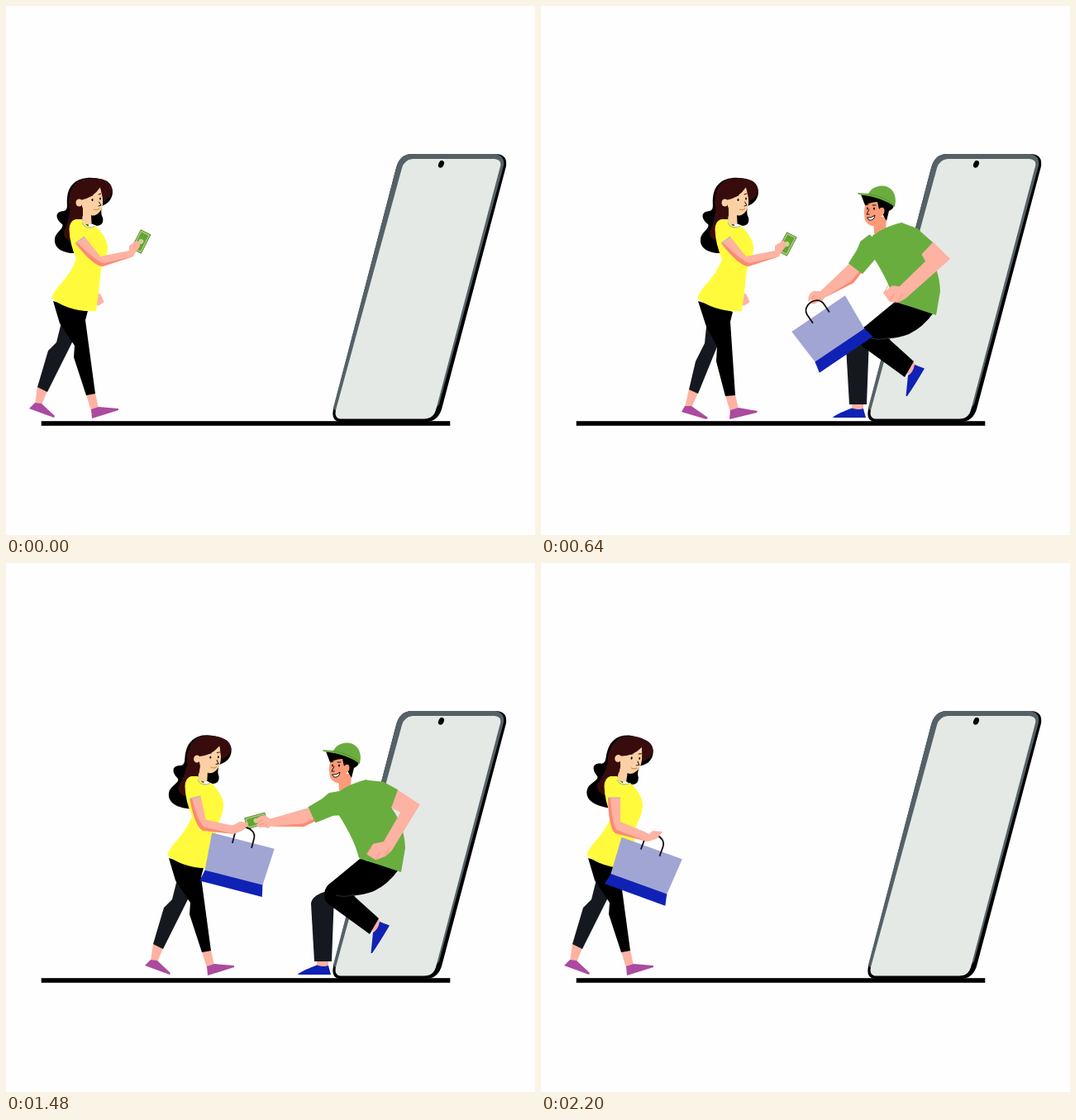
Write an HTML page that moves like this. It is 640 by 640 pixels and loops after 2440 ms.

```html
<!DOCTYPE html>
<html lang="en">
<head>
<meta charset="utf-8">
<title>Delivery from the phone</title>
<style>
html, body { margin: 0; width: 100%; height: 100%; overflow: hidden; background: #fefefe; }
svg { display: block; width: 100vw; height: 100vh; }
.skin { fill: #fdb2a2; }
.shade { fill: #fb8b72; }
.face { fill: #fcd0a4; }
.tan { fill: #fb9b78; }
.green { fill: #6aad3f; }
.navy { fill: #15191f; }
.blue { fill: #0f22b5; }
.purple { fill: #ab4a9f; }
.yellow { fill: #fffb3c; }
.brown { fill: #380c0d; }
.line { fill: none; stroke: #111; stroke-width: 1; stroke-linecap: round; }
.handle { fill: none; stroke: #111; stroke-width: 1.8; }
.crease { fill: none; stroke: #fb8b72; stroke-width: .8; }
.hem { fill: none; stroke: #b9bdb5; stroke-width: 1.3; }
</style>
</head>
<body>
<svg viewBox="0 0 640 640">
  <defs>
    <clipPath id="door"><path d="M0,0H590L412.5,640H0Z"/></clipPath>
    <g id="bag">
      <path fill="#a1a5d4" d="M266,321H344L341,368H269Z"/>
      <path class="blue" d="M269,367H341L344,381H266Z"/>
      <path class="handle" d="M293,327V315C293,301 317,301 317,315V327"/>
    </g>
    <g id="cash">
      <rect x="-12.6" y="-6.6" width="25.2" height="13.2" fill="#a9cc78" stroke="#4f7a2a" stroke-width=".8"/>
      <rect x="-10.6" y="-4.7" width="21.2" height="9.4" fill="#63a532"/>
      <circle r="3" fill="#c9d596"/>
    </g>
  </defs>

  <g id="phone">
    <path d="M490,179H592Q607,179 605,194L527,488Q522,503 508,503H404Q393,502 396,488L472,196Q476,180 490,179Z"/>
    <path fill="#566167" d="M490,179H593Q604,182 602,193L524,482L518,489H398L396,486L472,196Q476,180 490,179Z"/>
    <path fill="#e4e9e5" d="M492,185H591Q600,186 598,194L520,489Q517,499.5 506,499.5H404Q397,498 399,489L479,196Q482,186 492,185Z"/>
    <ellipse cx="526.5" cy="191.3" rx="3.2" ry="4.6" transform="rotate(25 526.5 191.3)"/>
  </g>
  <rect x="42.700" y="502.200" width="494.600" height="5.600"/>

  <g clip-path="url(#door)">
    <g id="man">
      <path class="skin" d="M376,480H390V489H376Z"/>
      <path class="blue" d="M353,498Q354,495 376,486.5Q383,489 390,487L393,498Z"/>
      <path class="navy" d="M369,412Q370,403 385,398L397,402L394,482H373Z"/>
      <path class="skin" d="M447,428L456,436L448,446L439,444Z"/>
      <path class="blue" d="M452,434L464,438.5Q452,459 443,472H441.5L444,447Q450,444 452,434Z"/>
      <path d="M428,358L475,371Q462,389 445,397Q432,402 420,402L451,430L440,449L396,417Q384,411 385,400Q386,391 394,386Z"/>
      <path fill="none" stroke="#2c3138" d="M399,402Q410,405 422,401"/>
      <path class="tan" d="M402,255H418L417,273Q410,278 403,275Z"/>
      <path class="green" d="M402,277Q418,266 436,262L452,272L467,297Q482,318 483,345L478,374L427,357Q422,335 402,304L394,290Z"/>
      <path d="M387,228L428,234Q428,246 421,248L418,260L410,246L392,241Z"/>
      <path class="tan" d="M392,241Q400,237 407,237L409,246Q412,242 415,245Q417,251 411,255L410,266Q396,268 392,259Q390,250 392,241Z"/>
      <path class="green" d="M383,226L396,227C403,213 429,213 429,236L428,243Q412,231 384,228Z"/>
      <path fill="none" stroke="#4f8a2c" stroke-width=".8" d="M396,227.5Q414,230 428,241"/>
      <ellipse cx="403" cy="245" rx="1" ry="1.5"/><ellipse cx="395" cy="245" rx=".9" ry="1.4"/>
      <path class="line" d="M401,241L405,241M393,241L396,240M397,246L394,252L397,252"/>
      <path fill="#fff" stroke="#111" d="M394.5,256Q400,257 404,253Q403,260 397,259Z"/>
      <path id="backArm" class="skin" stroke="#fdb2a2" stroke-width="1.5" stroke-linejoin="round"/>
      <path id="backFingers" class="crease"/>
      <path id="backSleeve" class="green"/>
      <g id="frontArm">
        <use id="manCash" href="#cash"/>
        <path class="skin" d="M365,292L318,300L312,295Q303,294 299,302L304,302L300,306L304,309L310,309L314,311L318,309L357,314L372,309Z"/>
        <path class="shade" d="M318,309L357,314L372,309L371,306L356,310.5Z"/>
        <path class="crease" d="M304,302L309,300M304,306L311,304M310,309L314,306"/>
        <path class="green" d="M406,276L392,277L383,283L365,291L372,311L394,305L412,306Z"/>
        <use id="manBag" href="#bag"/>
      </g>
    </g>
  </g>

  <g id="woman">
    <g id="hair">
      <path d="M98,208C110,207 118,211 122,212C132,219 131,234 120,240L116,242Q114,251 117,256Q119,265 110,266L100,262L96,299H84C70,299 58,294 59,282C59,274 71,269 68,264C60,258 58,249 70,248C76,246 73,240 74,232C75,218 84,209 98,208Z"/>
      <path class="brown" d="M93,248V262L84,285Q69,284 70,273Q76,262 77,247Z"/>
    </g>
    <path id="farArm" class="skin" stroke="#fdb2a2" stroke-linejoin="round"/>
    <path id="farShin" class="skin"/><path id="farShoe" class="purple"/><path id="farLeg" class="navy"/>
    <path id="nearShin" class="skin"/><path id="nearShoe" class="purple"/><path id="nearLeg"/>
    <path class="yellow" d="M84,258Q77,260 76.5,270Q77,288 85,306Q80,322 62,341Q55,351 55.5,354Q78,371 109,369Q113,340 115,318Q124,302 123,290Q120,277 108,266Q98,270 92,258Z"/>
    <g id="head">
      <path class="face" d="M90,234Q106,230 114,219Q118,230 117,240Q116,248 110,252Q106,254.5 103,253L103.5,263Q98,267 92,261L93,247Z"/>
      <path class="brown" d="M97,209C110,207 127,209 128.500,222Q128,231 118,236L114,219Q106,232 90,235L93,246V254Q86,259 78,258V247Q74,238 78,225Q83,211 97,209Z"/>
      <ellipse class="face" cx="88.5" cy="238" rx="4" ry="4.5"/>
      <ellipse cx="104.5" cy="234.5" rx="1" ry="1.6"/><ellipse cx="114" cy="233" rx=".9" ry="1.5"/>
      <path class="line" d="M102,230L105,229M112,228L115,227M112.5,237L115,241L112,242"/>
      <path fill="none" stroke="#c98a2c" d="M106,246Q110,248 113,245"/>
    </g>
    <path class="hem" d="M92,262Q96,271 107,266.5"/>
    <use id="womanBag" href="#bag"/>
    <use id="womanCash" href="#cash"/>
    <path id="nearArm" class="skin"/>
    <path id="nearShade" class="shade"/>
    <path id="cuff" class="hem"/>
  </g>
</svg>
<script>
const LOOP = 2440, STEP = 40, LAST = 2200, SWAP = 1240;
const $ = id => document.getElementById(id);
const numbers = s => s.match(/-?[\d.]+/g).map(Number);

// Blends two numbers, or two path strings of the same form.
function mix(a, b, u) {
  if (typeof a === "number") return a + (b - a) * u;
  const to = numbers(b);
  let i = 0;
  return a.replace(/-?[\d.]+/g, n => (+n + (to[i++] - n) * u).toFixed(2));
}

function at(track, t) {
  const k = track.findIndex(key => key[0] > t);
  if (k === 0) return track[0][1];
  if (k < 0) return track[track.length - 1][1];
  const [t0, a] = track[k - 1], [t1, b] = track[k];
  return mix(a, b, (t - t0) / (t1 - t0));
}

// Leg outlines run hip, front knee, front ankle, back ankle, back knee.
// Shoes run heel, throat, toe, sole.
const stride = {
  nearLeg: "M57,357L99,369L96,380L108,469L97,471L82,425L83,411L65,384Z",
  farLeg: "M67,383L88,380L81,405L50,467L38,461L51,417L61,407Z",
  nearShoe: "M103,488L112,485L136,487L136,489L104,499Z",
  farShoe: "M35,480L43,481L59,496L58,498L28,487Z"
};
const cross = {
  nearLeg: "M54,353L84,370L70,420L51,471L39,468L44,430L57,406L52,378Z",
  farLeg: "M80,370L107,368L107,420L107,474L95,474L86,430L91,412Z",
  nearShoe: "M36,487L48,486L67,500L65,502L32,496Z",
  farShoe: "M100,491L109,489L130,495L130,497L98,502Z"
};
const arrive = {
  nearLeg: "M56,357L98,370L95,382L101,471L89,472L78,430L79,412L66,388Z",
  farLeg: "M66,388L90,385L80,410L56,469L45,464L53,430L64,408Z",
  nearShoe: "M95,489L105,486L128,490L127,492L94,500Z",
  farShoe: "M40,484L48,484L68,498L66,500L36,491Z"
};
const stand = {
  nearLeg: "M56,357L84,367L79,400L68,472L57,472L56,432L65,403L56,376Z",
  farLeg: "M78,380L100,385L98,405L89,474L78,474L76,440L79,410Z",
  nearShoe: "M57,490L68,488L84,499L82,501L54,501Z",
  farShoe: "M79,492L88,490L109,499L108,501L78,501Z"
};
const leave = {
  nearLeg: "M55,355L86,369L68,430L58,471L47,470L49,430L61,410L53,384Z",
  farLeg: "M80,375L106,385L105,400L99,474L88,474L83,430L86,415Z",
  nearShoe: "M45,489L56,488L76,500L74,502L41,498Z",
  farShoe: "M90,492L99,490L121,497L122,499L89,502Z"
};
const walk = [[0, stride], [320, cross], [640, arrive], [680, stride],
              [1600, stride], [1680, stand], [1880, leave], [2200, stride]];
const legTrack = part => walk.map(([t, pose]) => [t, pose[part]]);

const offer = "M84,287L95,279L114,303L149,296L149,290L158,284L162,286L162,291L156,299L154,303L117,315Q106,315 84,287Z";
const swing = "M81,284L95,284L97,311L130,324L137,322L147,323L150,328L144,333L138,337L131,337L92,328Q82,322 81,284Z";
const meet = "M84,287L95,279L110,307L145,306L147,298L155,296L162,298L164,303L158,308L146,314L112,319Q100,320 84,287Z";
const carry = "M81,284L96,284L96,313L125,325L131,328L135,324L147,325L144,329L139,334L129,337L90,327Q82,322 81,284Z";

const farRest = "M100,300L104,340L109,347L114,349L118,358L112,362L108,361L95,330Z";
const farReach = "M112,300L121,317L150,309L156,305L167,309L157,316L124,327L112,322Z";
const farHidden = "M100,300L100,335L103,345L104,347L105,352L102,355L100,352L95,330Z";

const elbowLow = "M474,286L494,306L441,353L432,358L422,357L415,347L425,339L434,340L466,309L461,300Z";
const elbowHigh = "M474,272L502,287L474,345L466,353L458,358L447,352L451,340L465,335L480,297L468,292Z";
const elbowMid = "M474,278L498,297L460,349L453,355L439,359L429,352L439,341L451,340L477,305L465,298Z";
const elbowOut = "M472,290L490,306L432,350L425,355L415,356L405,345L415,337L427,337L464,310L461,302Z";
const sleeveLow = "M436,262L455,269L474,286L460,301L440,290Z";
const sleeveHigh = "M432,263L455,263L474,271L468,293L440,292Z";
const sleeveMid = "M437,262L458,266L474,277L465,298L440,291Z";

const paths = {
  nearLeg: legTrack("nearLeg"), farLeg: legTrack("farLeg"),
  nearShoe: legTrack("nearShoe"), farShoe: legTrack("farShoe"),
  nearArm: [[0, offer], [320, swing], [640, offer], [1100, meet], [SWAP, meet], [1640, carry]],
  farArm: [[0, farRest], [320, farReach], [640, farRest], [SWAP, farRest], [1600, farHidden]],
  backArm: [[640, elbowLow], [1100, elbowHigh], [SWAP, elbowHigh], [1680, elbowMid], [1880, elbowOut]],
  backSleeve: [[640, sleeveLow], [1100, sleeveHigh], [SWAP, sleeveHigh], [1680, sleeveMid], [1880, sleeveLow]]
};

// Places are "x y angle".
const womanX = [[0, 0], [320, 55], [640, 134], [680, 140], [1600, 140], [1680, 122], [1880, 66], [2200, 0]];
const headTurn = [[640, 0], [1100, 12], [SWAP, 12], [1680, 1], [1880, 6], [2200, 11]];
const womanCash = [[0, "163.3 285 -63"], [320, "147.5 328 -28"], [640, "163.5 288 -62"], [1100, "153 290 -62"]];
const womanBag = [[SWAP, "165 304 0"], [1640, "142 330 24"], [2200, "140 329 20"]];
const manX = [[0, 160], [280, 150], [320, 134], [640, 0], [1680, 0], [1880, 35], [2200, 160]];
const armTurn = [[320, -85], [640, -34], [1100, 0], [SWAP, 0], [1680, -12], [1880, -33], [2100, -85]];
const manCash = [[SWAP, "293 290 -62"], [1520, "302 302 0"]];
const bagShift = [[640, -4], [1100, 0]];

const move = (id, value) => $(id).setAttribute("transform", value);
const draw = (id, d) => $(id).setAttribute("d", d);
const show = (id, on) => $(id).setAttribute("visibility", on ? "visible" : "hidden");
function place(id, track, t, rest = "") {
  const [x, y, r] = numbers(at(track, t));
  move(id, `translate(${x} ${y}) rotate(${r}) ${rest}`);
}

function shin(side) {
  const leg = numbers($(side + "Leg").getAttribute("d"));
  const shoe = numbers($(side + "Shoe").getAttribute("d"));
  draw(side + "Shin", `M${leg[6]},${leg[7] - 1}L${leg[8]},${leg[9] - 1}L${shoe[0]},${shoe[1] + 2}L${shoe[2]},${shoe[3] + 2}Z`);
}

function render(t) {
  for (const id in paths) draw(id, at(paths[id], t));
  shin("near");
  shin("far");

  const n = numbers($("nearArm").getAttribute("d"));
  const [wx, wy, ex, ey, cx, cy, sx, sy] = n.slice(18);
  draw("nearShade", `M${sx},${sy}Q${cx},${cy} ${ex},${ey}L${wx},${wy}L${ex + 2},${ey - 4}Q${cx + 4},${cy - 5} ${sx + 3},${sy}Z`);
  draw("cuff", `M${n[0]},${n[1]}L${n[2]},${n[3]}`);

  const h = numbers($("backArm").getAttribute("d"));
  draw("backFingers", [6, 8, 10].map(i => `M${h[i]},${h[i + 1]}l5,-9`).join(""));

  move("woman", `translate(${at(womanX, t)} 0)`);
  const turn = `rotate(${at(headTurn, t)} 99 262)`;
  move("head", turn);
  move("hair", turn);
  place("womanCash", womanCash, t);
  place("womanBag", womanBag, t, "translate(-305 -304)");

  move("man", `translate(${at(manX, t)} 0)`);
  move("frontArm", `rotate(${at(armTurn, t)} 402 290)`);
  place("manCash", manCash, t);
  move("manBag", `translate(${at(bagShift, t)} 0)`);

  const swapped = t >= SWAP;
  show("womanCash", !swapped);
  show("manBag", !swapped);
  show("womanBag", swapped);
  show("manCash", swapped);
}

const start = performance.now();
function tick() {
  const t = (performance.now() - start) % LOOP;
  render(Math.min(LAST, Math.floor(t / STEP) * STEP));
  requestAnimationFrame(tick);
}
tick();
</script>
</body>
</html>
```
